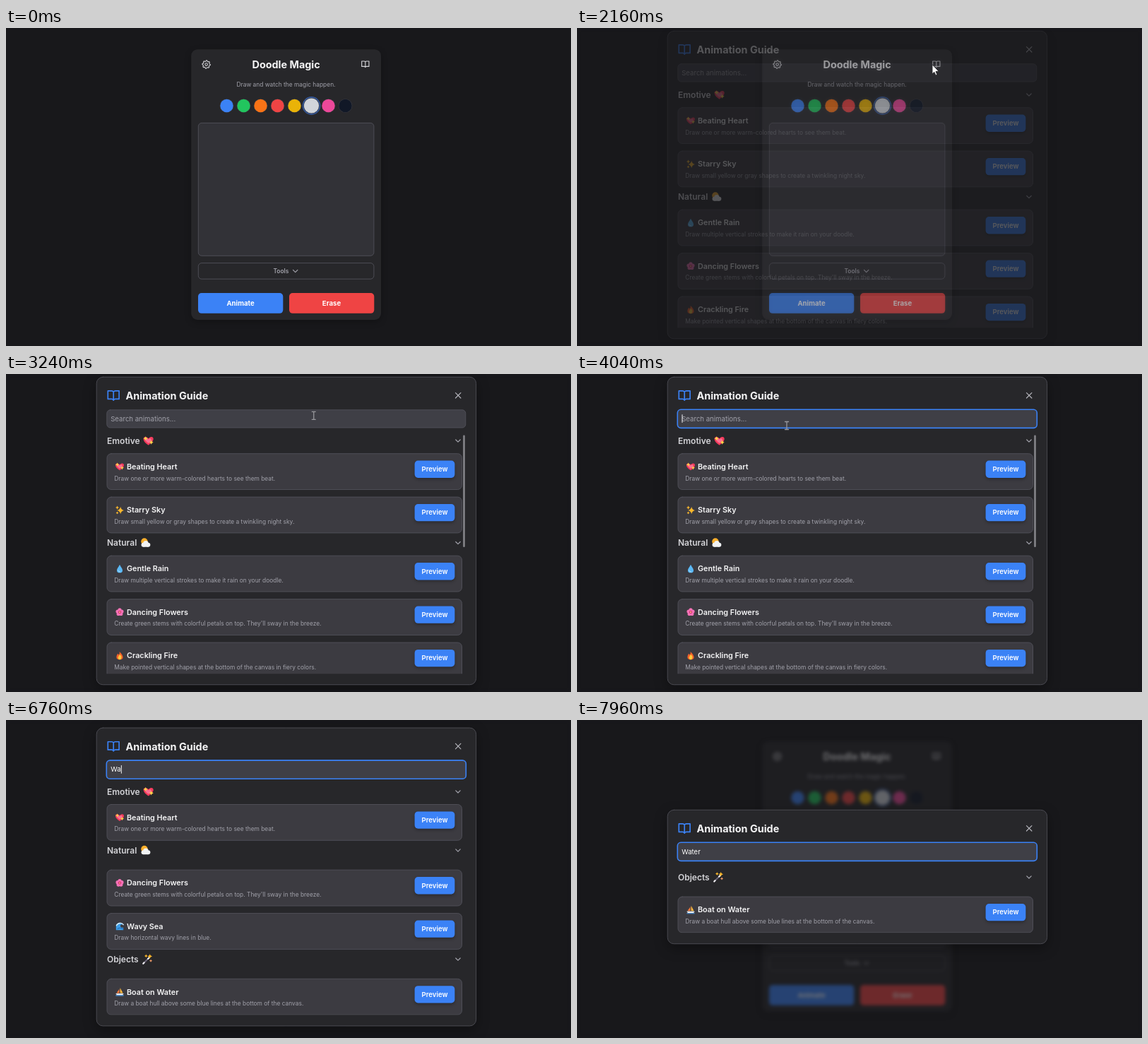
Write an HTML page with a canvas that moves like this. It is 800x450 px and loops after 8000 ms.

```html
<!DOCTYPE html>
<html lang="en">
<head>
<meta charset="utf-8">
<title>Doodle Magic</title>
<style>
html, body { margin: 0; width: 100%; height: 100%; overflow: hidden; background: #18181b; }
canvas { display: block; width: 800px; height: 450px; }
</style>
</head>
<body>
<canvas id="stage" width="800" height="450"></canvas>
<script>
const W = 800, H = 450, LOOP = 8000;
const BG = '#18181b', PANEL = '#27272a', LINE = '#52525b', BLUE = '#3b82f6', RED = '#ef4444';
const stage = document.getElementById('stage').getContext('2d');
let c = stage;

function layer() {
  const el = document.createElement('canvas');
  el.width = W;
  el.height = H;
  return el.getContext('2d');
}

// Draw into another context, then return to the previous one
function drawOn(ctx, fn) {
  const old = c;
  c = ctx;
  fn();
  c = old;
}

// ---- helpers ----
function text(str, x, mid, size, weight, color, align = 'left') {
  c.font = `${weight} ${size}px Inter, sans-serif`;
  c.textAlign = align;
  c.fillStyle = color;
  c.fillText(str, x, mid + size * 0.364);
  return c.measureText(str).width;
}

function box(x, y, w, h, r, fill, stroke, lw = 1) {
  c.beginPath();
  c.roundRect(x, y, w, h, r);
  if (fill) { c.fillStyle = fill; c.fill(); }
  if (stroke) { c.strokeStyle = stroke; c.lineWidth = lw; c.stroke(); }
}

function disc(x, y, r, fill) {
  c.beginPath();
  c.arc(x, y, r, 0, 7);
  c.fillStyle = fill;
  c.fill();
}

function line(points, color, lw) {
  c.beginPath();
  points.forEach(([x, y]) => c.lineTo(x, y));
  c.strokeStyle = color;
  c.lineWidth = lw;
  c.lineCap = c.lineJoin = 'round';
  c.stroke();
}

function shape(d, fill, stroke, lw = 1) {
  const p = new Path2D(d);
  if (fill) { c.fillStyle = fill; c.fill(p); }
  if (stroke) {
    c.strokeStyle = stroke;
    c.lineWidth = lw;
    c.lineCap = c.lineJoin = 'round';
    c.stroke(p);
  }
}

function at(x, y, scale, fn) {
  c.save();
  c.translate(x, y);
  c.scale(scale, scale);
  fn();
  c.restore();
}

function shadowed(color, blur, dy, fn) {
  c.save();
  c.shadowColor = color;
  c.shadowBlur = blur;
  c.shadowOffsetY = dy;
  fn();
  c.restore();
}

const chevron = (x, y, color) =>
  line([[x - 3.2, y - 1.6], [x, y + 1.6], [x + 3.2, y - 1.6]], color, 1.2);

function book(x, y, scale, color, lw) {
  at(x, y, scale, () => shape(
    'M0 -5.5V8M0 -5Q-1 -7 -3 -7H-9V6H-3Q-1 6 0 8Q1 6 3 6H9V-7H3Q1 -7 0 -5', null, color, lw));
}

function gear(x, y) {
  c.beginPath();
  for (let i = 0; i < 32; i++) {
    const a = i / 32 * Math.PI * 2, r = i % 4 < 2 ? 5.7 : 4.5;
    c.lineTo(x + r * Math.cos(a), y + r * Math.sin(a));
  }
  c.closePath();
  c.strokeStyle = '#d4d4d8';
  c.lineWidth = 1.1;
  c.lineJoin = 'round';
  c.stroke();
  c.beginPath();
  c.arc(x, y, 1.8, 0, 7);
  c.stroke();
}

// ---- small pictures, drawn in a box from -10 to 10 ----
const SPARK = 'M0 -7Q1 -1 7 0Q1 1 0 7Q-1 1 -7 0Q-1 -1 0 -7Z';
const spark = (x, y, s, color) => at(x, y, s, () => shape(SPARK, color));

const pictures = {
  heart() {
    shape('M0 9C-18 -2 -9 -14 0 -5C9 -14 18 -2 0 9Z', '#f43b5c');
    shape('M0 5C-11 -2 -5 -8 0 -3C5 -8 11 -2 0 5Z', '#fb7093');
    spark(-6, -5, .65, '#ffd54a');
    spark(6, 3, .65, '#ffd54a');
  },
  sparkles() {
    spark(2, 1, 1.3, '#fbb72c');
    spark(-6, -6, .65, '#fbb72c');
    spark(-6, 7, .5, '#fbb72c');
  },
  cloud() {
    disc(-2, -3, 7, '#fbb02d');
    [[-4, 4, 4.5], [1, 1, 5.5], [6, 4, 4.5]].forEach(([x, y, r]) => disc(x, y, r, '#f1f3f5'));
    box(-5, 4, 12, 4.5, 2, '#f1f3f5');
  },
  drop() {
    shape('M0 -10C3 -4 7 0 7 4A7 6 0 0 1 -7 4C-7 0 -3 -4 0 -10Z', '#5bb8f5');
    shape('M-4 4Q-3 8 1 8', null, '#b8e3ff', 1.6);
  },
  flower() {
    for (let i = 0; i < 5; i++) {
      const a = i * Math.PI * .4 - Math.PI / 2;
      disc(5.4 * Math.cos(a), 5.4 * Math.sin(a), 4.5, '#f472b6');
    }
    disc(0, 0, 3.6, '#d6246e');
    disc(0, 0, 1.6, '#ffe08a');
  },
  fire() {
    shape('M-1 -10C3 -6 8 -1 8 4A8 6 0 0 1 -8 4C-8 0 -6 -2 -5 -5L-3 -2Q1 -5 -1 -10Z', '#f4622a');
    shape('M0 -3C4 1 5 3 4 6A4 4 0 0 1 -4 6C-5 3 -1 1 0 -3Z', '#ffc83d');
  },
  wave() {
    shape('M-9 9V-1C-8 -10 5 -12 9 -4C4 -6 0 -3 2 1Q4 4 9 3V9Z', '#3f9ee8');
    shape('M-8 -2C-5 -9 5 -10 9 -4', null, '#d9f0ff', 2.4);
    shape('M-5 6Q0 2 8 6', null, '#1b66b5', 1.8);
  },
  wand() {
    line([[-8, 9], [4, -3]], '#6b6478', 3);
    line([[-8, 9], [-6, 7]], '#f4f4f5', 3);
    line([[2, -1], [5, -4]], '#f4f4f5', 3);
    spark(6, -6, .7, '#fbb72c');
    spark(-2, -7, .5, '#fbb72c');
    spark(8, 3, .45, '#f59e6b');
  },
  boat() {
    shape('M1 -10L8 3H1Z', '#ffb83d');
    shape('M-1 -7V3H-8Z', '#f4793b');
    shape('M-10 4H10L7 8H-7Z', '#e9edf2');
    shape('M-9 9H9', null, '#4a9bea', 1.8);
  }
};
const picture = (name, x, y, size) => at(x, y, size / 20, pictures[name]);

// ---- main panel ----
const SWATCHES = ['#3b82f6', '#22c55e', '#f97316', '#ef4444', '#eab308', '#d1d5db', '#ec4899', '#111827'];

function bigButton(label, x, color) {
  box(x, 375, 120.3, 28.8, 4.8, color);
  text(label, x + 60, 389.6, 9.6, 700, '#fff', 'center');
}

function drawApp() {
  c.fillStyle = BG;
  c.fillRect(0, 0, W, H);
  shadowed('rgba(0,0,0,.25)', 10, 3, () => box(262.2, 30.2, 268.8, 382.8, 9, PANEL));
  gear(283.6, 51.6);
  text('Doodle Magic', 396.6, 52, 14.4, 700, '#f4f4f5', 'center');
  book(508.8, 51, .57, '#d4d4d8', 2);
  text('Draw and watch the magic happen.', 396.5, 80, 8.4, 400, '#a1a1aa', 'center');
  SWATCHES.forEach((color, i) => {
    const x = 312.5 + 24 * i, on = i === 5;
    if (on) {
      disc(x, 110, 12.9, '#35599c');
      disc(x, 110, 11.2, '#323a4b');
    }
    disc(x, 110, on ? 10.7 : 9.8, '#3a3a40');
    disc(x, 110, on ? 10.6 : 9.2, color);
  });
  box(272.3, 134.4, 248.6, 187.9, 4.8, '#323237', LINE, .9);
  box(272.3, 332.6, 248.6, 22.6, 4.8, null, LINE, .9);
  text('Tools', 378.5, 344, 8.4, 600, '#a1a1aa');
  chevron(409.7, 344, '#a1a1aa');
  bigButton('Animate', 272, BLUE);
  bigButton('Erase', 401, RED);
}

// ---- guide ----
const GUIDE = [
  ['Emotive', 'heart', [
    ['Beating Heart', 'heart', 'Draw one or more warm-colored hearts to see them beat.'],
    ['Starry Sky', 'sparkles', 'Draw small yellow or gray shapes to create a twinkling night sky.']]],
  ['Natural', 'cloud', [
    ['Gentle Rain', 'drop', 'Draw multiple vertical strokes to make it rain on your doodle.'],
    ['Dancing Flowers', 'flower', 'Create green stems with colorful petals on top. They\'ll sway in the breeze.'],
    ['Crackling Fire', 'fire', 'Make pointed vertical shapes at the bottom of the canvas in fiery colors.'],
    ['Wavy Sea', 'wave', 'Draw horizontal wavy lines in blue.']]],
  ['Objects', 'wand', [
    ['Placeholder', 'boat', ''],
    ['Boat on Water', 'boat', 'Draw a boat hull above some blue lines at the bottom of the canvas.']]]
];
const ROW = 51.6, GAP = 9.6;

// Rows that match the query, with y measured from the top of the dialog
function layout(query) {
  const q = query.toLowerCase(), rows = [];
  let y = 90.3;
  GUIDE.forEach(([name, icon, items], s) => {
    const found = items.filter(([title, , note]) => note && (title + ' ' + note).toLowerCase().includes(q));
    if (!found.length) return;
    if (!rows.length && s) y += 4.8;
    rows.push({ head: true, name, icon, y });
    y += 17.7 + (found[0] === items[0] ? 0 : GAP);
    for (const [title, pic, note] of found) {
      rows.push({ name: title, icon: pic, note, y });
      y += ROW + GAP + .2;
    }
    y += 13.8 - GAP - .2;
  });
  return { rows, height: Math.min(435.4, y - 13.8 + 15.4) };
}

function drawRow(row, top) {
  const y = top + row.y;
  if (row.head) {
    const w = text(row.name, 143, y, 12, 600, '#d4d4d8');
    picture(row.icon, 143 + w + 12, y, 13.5);
    chevron(640, y, '#a1a1aa');
    return;
  }
  box(143, y + .4, 502.5, ROW - .8, 6, '#3c3b41', LINE, .9);
  picture(row.icon, 161, y + 18.8, 11.5);
  text(row.name, 171, y + 18.7, 10.8, 600, '#f4f4f5');
  text(row.note, 153.3, y + 35.2, 8.4, 400, '#a1a1aa');
  shadowed('rgba(0,0,0,.3)', 4, 2, () => box(578.6, y + 10.3, 56.8, 24.3, 4.8, BLUE));
  text('Preview', 607, y + 22.3, 9.6, 600, '#fff', 'center');
}

const FOCUS = 3970, BLINK = 530, SCROLL = 3200;
const KEYS = [['W', 6200], ['a', 6560], ['t', 6880], ['e', 7120], ['r', 7400]];

function drawGuide(t) {
  const typed = KEYS.filter(k => t >= k[1]);
  const query = typed.map(k => k[0]).join('');
  const { rows, height } = layout(query);
  const top = 222 - height / 2, mid = top + 58.8;
  const focused = t >= FOCUS;

  shadowed('rgba(0,0,0,.35)', 18, 6, () => box(128.2, top, 537.4, height, 9, PANEL));
  box(128.2, top, 537.4, height, 9, null, '#4a4a51', 1);
  book(152.2, top + 25.8, .88, BLUE, 1.9);
  text('Animation Guide', 169.5, top + 26.2, 14.4, 700, '#f4f4f5');
  const x = 640.2, y = top + 26;
  line([[x - 3.7, y - 3.7], [x + 3.7, y + 3.7]], '#b4b4bb', 1.2);
  line([[x - 3.7, y + 3.7], [x + 3.7, y - 3.7]], '#b4b4bb', 1.2);

  if (focused) box(142.3, top + 46, 509, 26.1, 4.8, '#3f3f46', BLUE, 1.6);
  else box(142.8, top + 46.5, 508, 25.2, 4.8, '#3f3f46', LINE, .9);
  const w = query
    ? text(query, 148.2, mid, 9.6, 400, '#fff')
    : (text('Search animations...', 148.2, mid, 9.6, 400, '#a1a1aa'), 0);
  const since = t - (typed.length ? typed[typed.length - 1][1] : FOCUS);
  if (focused && Math.floor(since / BLINK) % 2 === 0) {
    c.fillStyle = '#f4f4f5';
    c.fillRect(148.5 + w, mid - 5.8, 1, 11.6);
  }

  c.save();
  c.beginPath();
  c.rect(130, top + 81, 530, height - 96.4);
  c.clip();
  rows.forEach(row => drawRow(row, top));
  c.restore();
  if (t >= SCROLL && query.length < 2) {
    box(647.2, top + 82.3, 2.6, query ? 180 : 158.5, 1.3, '#85858a');
  }
}

// ---- pointer ----
const PATH = [
  [40, -4, 330], [880, 242, 270], [1320, 436.5, 96.5], [1680, 503, 52],
  [2920, 503, 52], [3760, 297, 73], [4300, 297, 73], [4400, 296, 73]
];

function pointer(t) {
  const i = PATH.findIndex(p => p[0] > t);
  if (i < 0) return PATH[PATH.length - 1].slice(1);
  const [t0, x0, y0] = PATH[i - 1], [t1, x1, y1] = PATH[i];
  let k = (t - t0) / (t1 - t0);
  if (i > 2) k = k * k * (3 - 2 * k);
  return [x0 + (x1 - x0) * k, y0 + (y1 - y0) * k];
}

function drawPointer(t) {
  if (t < PATH[0][0] || t >= KEYS[0][1]) return;
  const [x, y] = pointer(t);
  const open = t >= OPEN;
  const overSearch = open && y > 56 && y < 76 && x < 651;
  const overDots = !open && Math.abs(y - 110) < 16 && x > 302 && x < 491;
  const overBook = !open && x > 497 && y < 60;
  c.save();
  c.translate(x, y);
  if (overSearch) {
    shape('M-2.5 -5.5H2.5M0 -5.5V5.5M-2.5 5.5H2.5', null, '#98989d', 1.3);
  } else if (overDots || overBook) {
    shape('M-1 1Q0 -1 1.2 1V5L5 5.8Q7 6.2 6.8 8.5L6 12.5H0.8L-3 8.2Q-3.6 6.6 -2 7L-1 8Z',
      '#fff', '#303034', .9);
    shape('M2.8 5.6V7.6M4.6 6V7.8', null, '#77777c', .6);
  } else {
    shape('M0 0V13L2.9 10.4L5 15L7 14.1L5 9.6L8.8 9.2Z', '#fff', '#2b2b2e', .9);
  }
  c.restore();
}

// ---- scene ----
const OPEN = 2120, FADE = 400;
const app = layer(), blurred = layer(), dialog = layer();

function prepare() {
  drawOn(app, drawApp);
  drawOn(blurred, () => {
    c.fillStyle = BG;
    c.fillRect(0, 0, W, H);
    c.filter = 'blur(2.6px)';
    c.drawImage(app.canvas, 0, 0);
    c.filter = 'none';
    c.globalAlpha = .6;
    c.fillRect(0, 0, W, H);
    c.globalAlpha = 1;
  });
}

function render(t) {
  c.drawImage(app.canvas, 0, 0);
  if (t >= OPEN) {
    const k = Math.min(1, (t - OPEN) / FADE);
    drawOn(dialog, () => {
      c.clearRect(0, 0, W, H);
      drawGuide(t);
    });
    c.globalAlpha = 1 - (1 - k) ** 3;
    c.drawImage(blurred.canvas, 0, 0);
    c.drawImage(dialog.canvas, 0, 0);
    c.globalAlpha = 1;
  }
  drawPointer(t);
}

prepare();
const start = performance.now();
function tick() {
  render((performance.now() - start) % LOOP);
  requestAnimationFrame(tick);
}
render(0);
requestAnimationFrame(tick);
</script>
</body>
</html>
```
